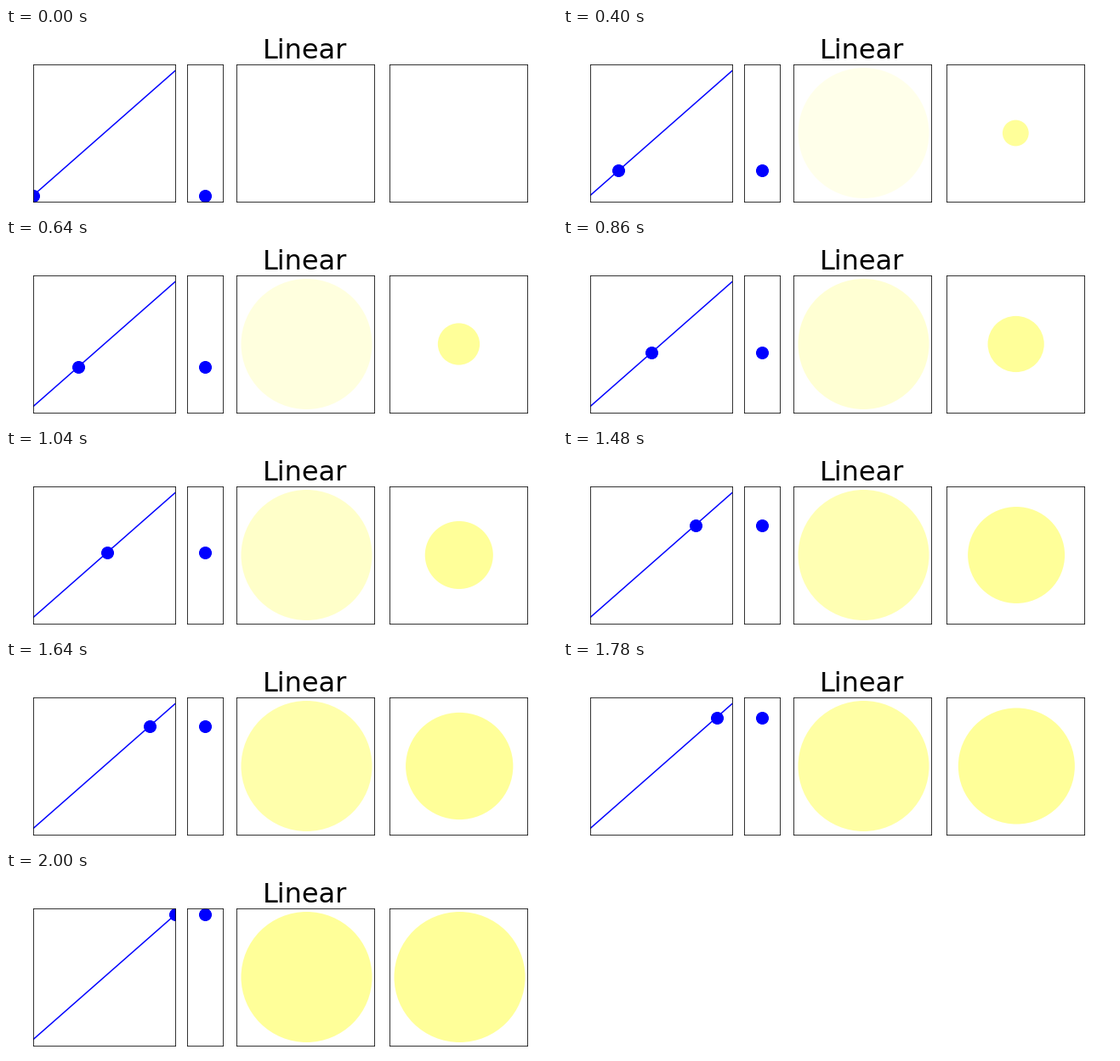
A matplotlib script for the animation above (2020 ms loop, 648x216 px).

```python
import matplotlib.pyplot as plt
from matplotlib.animation import FuncAnimation
from matplotlib.patches import Circle

W, H, DPI = 648, 216, 72
STEPS = 101
TOP, BOTTOM = 43, 205
HALF = (BOTTOM - TOP) / 2
RADIUS, SHIFT = 77, 1.5
YELLOW = "#ffff99"

fig = plt.figure(figsize=(W / DPI, H / DPI), dpi=DPI, facecolor="white")


def panel(left, right, xlim, ylim):
    ax = fig.add_axes([left / W, 1 - BOTTOM / H,
                       (right - left) / W, (BOTTOM - TOP) / H])
    ax.set(xticks=[], yticks=[], xlim=xlim, ylim=ylim)
    return ax


def disc(ax):
    patch = Circle((SHIFT, 0), RADIUS, facecolor=YELLOW, edgecolor="none")
    return ax.add_patch(patch)


def dot(ax):
    return ax.plot([0], [0], "o", color="blue", markersize=14)[0]


unit = (-0.05, 1.05)
square = (-HALF, HALF)
curve_ax = panel(32, 199, (0, 1), unit)
track_ax = panel(213, 255, (-1, 1), unit)
fade_ax = panel(271, 433, square, square)
zoom_ax = panel(451, 613, square, square)

fig.text(302 / W, 180 / H, "Linear", fontsize=32, family="DejaVu Sans",
         ha="left", va="baseline")


def ease(t):
    return t


ts = [i / (STEPS - 1) for i in range(STEPS)]
curve_ax.plot(ts, [ease(t) for t in ts], color="blue", linewidth=1.5)
curve_dot, track_dot = dot(curve_ax), dot(track_ax)
fade_disc, zoom_disc = disc(fade_ax), disc(zoom_ax)


def update(i):
    t = i / (STEPS - 1)
    v = ease(t)
    curve_dot.set_data([t], [v])
    track_dot.set_data([0], [v])
    fade_disc.set_alpha(v)
    zoom_disc.set_radius(RADIUS * v)
    zoom_disc.set_center((SHIFT * v, 0))
    zoom_disc.set_visible(v > 0)
    return curve_dot, track_dot, fade_disc, zoom_disc


anim = FuncAnimation(fig, update, frames=STEPS, interval=20, repeat=True)
plt.show()
```
